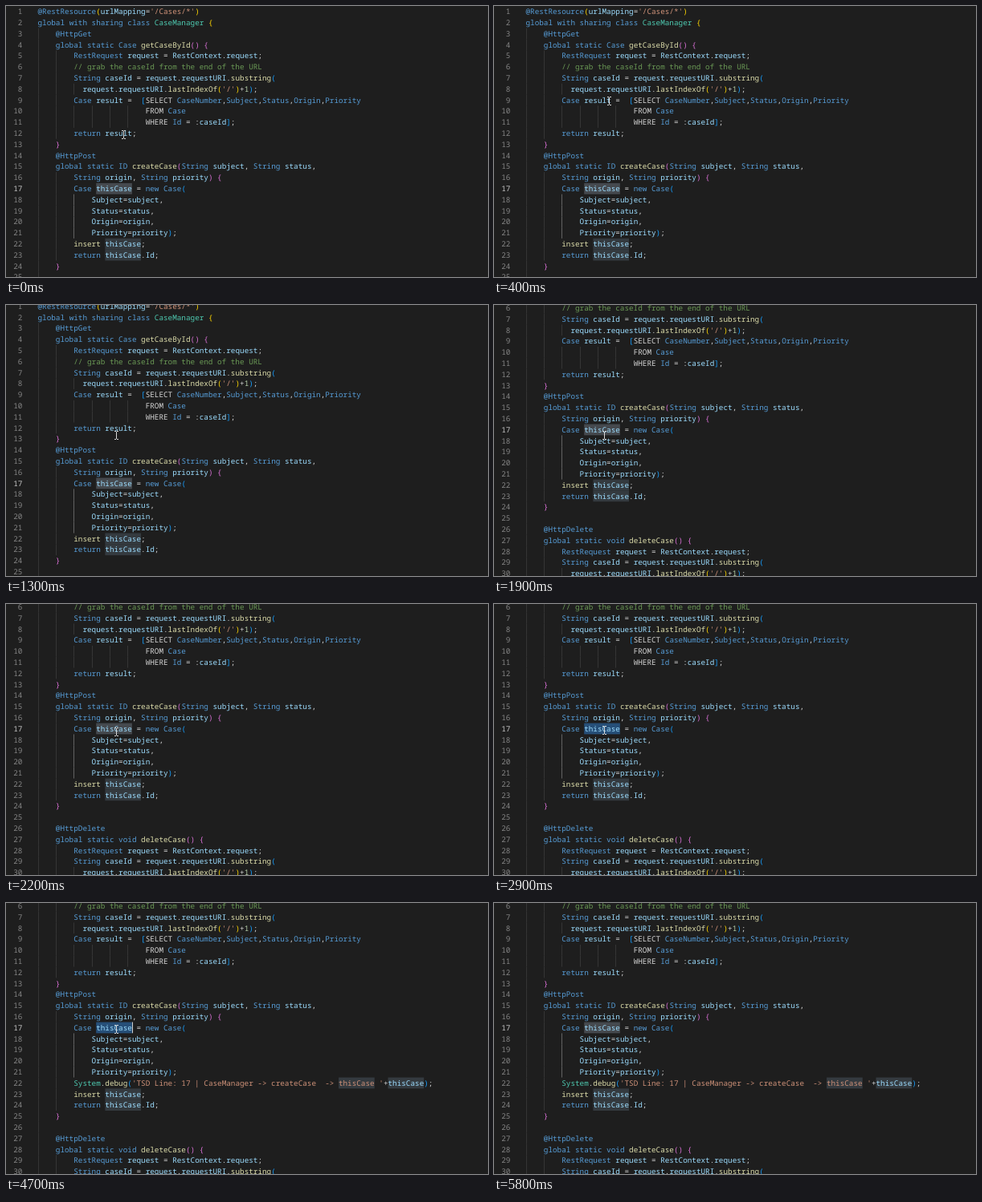
Write an HTML page with a canvas that moves like this. It is 600x338 px and loops after 5900 ms.

```html
<!DOCTYPE html>
<html lang="en">
<head>
<meta charset="utf-8">
<title>Code editor</title>
<style>
html, body { margin: 0; width: 100%; height: 100%; overflow: hidden; background: #1e1e1e; }
canvas { display: block; }
</style>
</head>
<body>
<canvas id="stage" width="600" height="338"></canvas>
<script>
const ctx = document.getElementById('stage').getContext('2d');
const LOOP = 5900, CHAR = 5.59, LINE = 13.8, LEFT = 39.5, SCROLL = 72.3;
const BLUE = '#569cd6', PALE = '#9cdcfe', TEAL = '#4ec9b0', YELLOW = '#dcdcaa', PLAIN = '#d4d4d4';
const BRACKETS = ['#ffd700', '#da70d6', '#179fff'];

const CODE = `@RestResource(urlMapping='/Cases/*')
global with sharing class CaseManager {
    @HttpGet
    global static Case getCaseById() {
        RestRequest request = RestContext.request;
        // grab the caseId from the end of the URL
        String caseId = request.requestURI.substring(
          request.requestURI.lastIndexOf('/')+1);
        Case result =  [SELECT CaseNumber,Subject,Status,Origin,Priority
                        FROM Case
                        WHERE Id = :caseId];
        return result;
    }
    @HttpPost
    global static ID createCase(String subject, String status,
        String origin, String priority) {
        Case thisCase = new Case(
            Subject=subject,
            Status=status,
            Origin=origin,
            Priority=priority);
        insert thisCase;
        return thisCase.Id;
    }

    @HttpDelete
    global static void deleteCase() {
        RestRequest request = RestContext.request;
        String caseId = request.requestURI.substring(
          request.requestURI.lastIndexOf('/')+1);`.split('\n');
const DEBUG = `        System.debug('TSD Line: 17 | CaseManager -> createCase  -> thisCase '+thisCase);`;
const DEBUG_CODE = [...CODE.slice(0, 21), DEBUG, ...CODE.slice(21)];

// Token patterns in order of priority; brackets take their colour from nesting depth.
const RULES = [
  [/\/\/.*/y, '#6a9955'],
  [/'[^']*'/y, '#ce9178'],
  [/@\w+/y, BLUE],
  [/\d+/y, '#b5cea8'],
  [/(global|with|sharing|class|static|return|new|void|ID|String|Case|RestRequest)\b/y, BLUE],
  [/(CaseNumber|(Subject|Status|Origin|Priority)(?!=)|Id(?= =))\b/y, BLUE],
  [/(CaseManager|System)\b/y, TEAL],
  [/(SELECT|FROM|WHERE)\b/y, PLAIN],
  [/insert\b|\w+(?=\()/y, YELLOW],
  [/\w+/y, PALE],
  [/[()[\]{}]/y, null],
  [/[^\s\w]/y, PLAIN]
];

function tokenize(lines) {
  let depth = 0;
  return lines.map(text => {
    const tokens = [];
    for (let col = 0; col < text.length;) {
      let step = 1;
      for (const [pattern, fixed] of RULES) {
        pattern.lastIndex = col;
        const match = pattern.exec(text);
        if (!match) continue;
        const word = match[0];
        let color = fixed;
        if (!color) color = BRACKETS[('([{'.includes(word) ? depth++ : --depth) % 3];
        tokens.push({ col, word, color });
        step = word.length;
        break;
      }
      col += step;
    }
    return { text, tokens, indent: text ? text.search(/\S/) : 4 };
  });
}

const before = tokenize(CODE), after = tokenize(DEBUG_CODE);
const colX = col => LEFT + col * CHAR;

function ease(t, start, end) {
  const p = Math.min(1, Math.max(0, (t - start) / (end - start)));
  return p * p * (3 - 2 * p);
}

function rect(color, x, y, w, h) {
  ctx.fillStyle = color;
  ctx.fillRect(x, y, w, h);
}

function drawLine(line, n, y, t, selected) {
  const baseline = y + 10.1;
  for (let col = 0; col < line.indent; col += 4) {
    const active = col === 8 && n >= 18 && n <= 21;
    rect(active ? '#626262' : '#353535', Math.round(colX(col)), y, 1, LINE);
  }

  for (const { index } of line.text.matchAll(/\bthisCase\b/g)) {
    if (line.text === DEBUG && t < 3800) continue;
    const color = n !== 17 ? '#343a3f' : selected ? '#264f78' : '#45494e';
    rect(color, colX(index), y, 8 * CHAR, LINE);
  }

  ctx.textAlign = 'right';
  ctx.fillStyle = n === 17 ? '#c6c6c6' : '#858585';
  ctx.fillText(n, 20.3, baseline);
  ctx.textAlign = 'left';
  for (const { col, word, color } of line.tokens) {
    ctx.fillStyle = color;
    ctx.fillText(word, colX(col), baseline);
  }
}

function drawPointer(t) {
  const up = ease(t, 0, 700), down = ease(t, 700, 1300), settle = ease(t, 1900, 2400);
  const x = Math.round(146 - 5 * up - 4 * down);
  const y = Math.round(160 - 70 * up + 72 * down - 5 * settle);
  rect('#d8d8d8', x, y - 4, 1, 9);
  for (const edge of [-5, 5]) {
    rect('#d8d8d8', x - 2, y + edge, 2, 1);
    rect('#d8d8d8', x + 1, y + edge, 2, 1);
  }
}

function draw(now) {
  const t = Math.floor(now % LOOP / 100) * 100;
  const scroll = SCROLL * ease(t, 1200, 1800);
  const selected = t >= 2500 && t < 5600;
  const lines = t < 3300 ? before : after;

  rect('#1e1e1e', 0, 0, 600, 338);
  ctx.font = '9.32px "Noto Sans Mono", "DejaVu Sans Mono", monospace';
  ctx.textRendering = 'geometricPrecision';
  lines.forEach((line, i) => drawLine(line, i + 1, i * LINE - scroll + 0.1, t, selected));

  const caretOn = (t + 600) % 1000 < 500;
  if (selected && caretOn) rect('#d0d0d0', 157, 16 * LINE - scroll, 1, LINE);
  if (t < 5600) drawPointer(t);
  requestAnimationFrame(draw);
}
requestAnimationFrame(draw);
</script>
</body>
</html>
```
